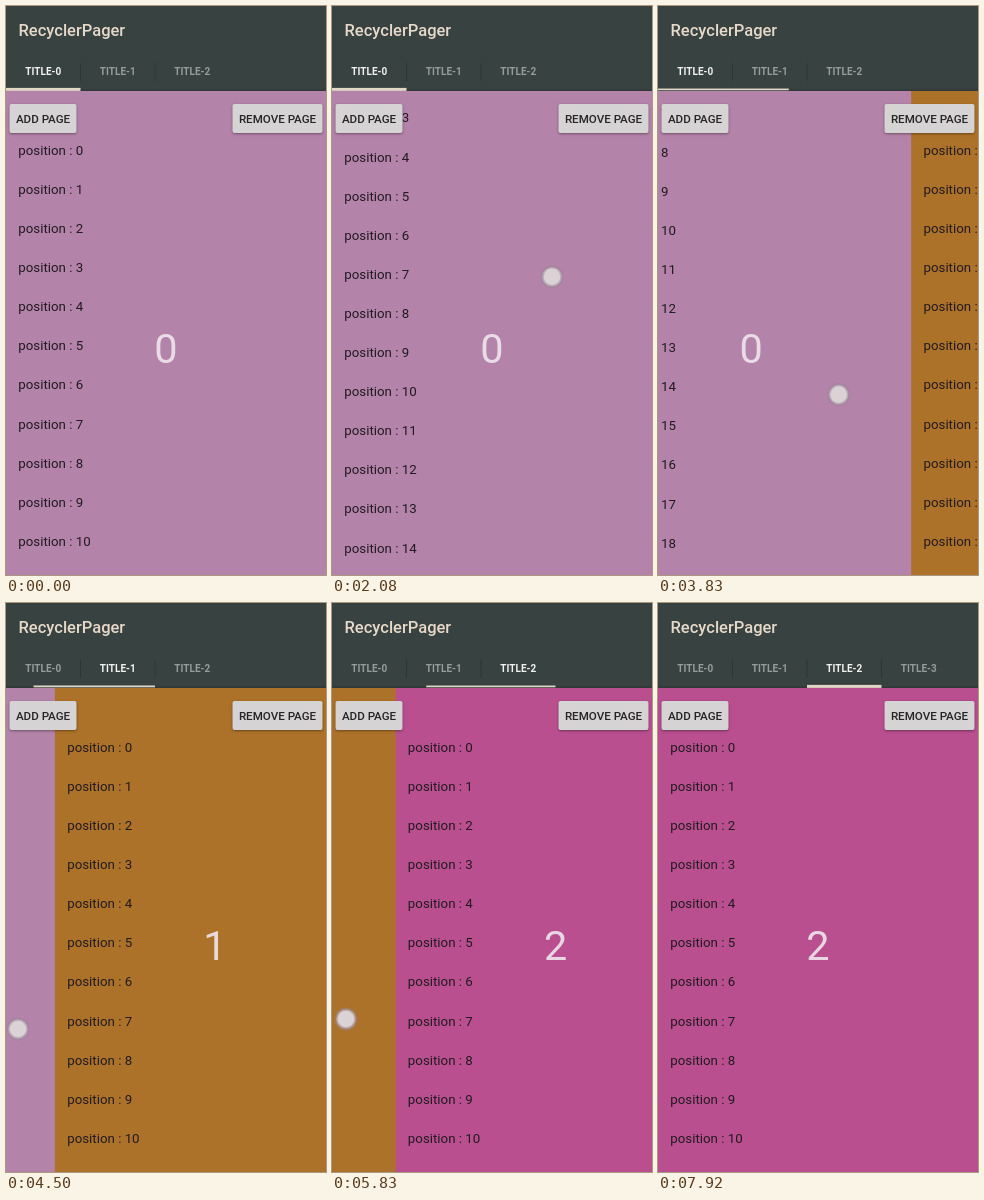
Animation, 320 px wide and 569 px high, one loop 8000 ms. Source, as an HTML page with a canvas:

```html
<!DOCTYPE html>
<html lang="en">
<head>
<meta charset="utf-8">
<title>RecyclerPager</title>
<style>
html, body { margin: 0; width: 100%; height: 100%; overflow: hidden; background: #384241; }
canvas { display: block; width: 100vw; height: 100vh; }
</style>
</head>
<body>
<canvas id="stage"></canvas>
<script>
const W = 320, H = 569, LOOP = 8000;
const BAR = 85, TAB = 74.5, ROW = 39.1;
const PAGES = ['#b483a9', '#ad7229', '#b94f8f'];
const canvas = document.getElementById('stage');
const ctx = canvas.getContext('2d');
const dpr = window.devicePixelRatio || 1;
canvas.width = Math.round(W * dpr);
canvas.height = Math.round(H * dpr);

const clamp = (v, a = 0, b = 1) => Math.min(b, Math.max(a, v));
const ramp = (t, a, b) => clamp((t - a) / (b - a));
const easeOut = (u, p) => 1 - Math.pow(1 - u, p);

// Linear track through [time, ...values] keys.
function track(keys, t) {
  if (t <= keys[0][0]) return keys[0].slice(1);
  for (let i = 1; i < keys.length; i++) {
    const a = keys[i - 1], b = keys[i];
    if (t <= b[0]) {
      const u = ramp(t, a[0], b[0]);
      return a.slice(1).map((v, k) => v + (b[k + 1] - v) * u);
    }
  }
  return keys[keys.length - 1].slice(1);
}

const SCROLL = { keys: [[130, 0], [1000, 56], [2080, 149.4], [2330, 215]], end: 3080, to: 311 };

// grip is the finger x at which the page begins to follow; settle is its snap time.
const SWIPES = [
  { down: 3330, up: 4410, settle: 380, grip: 247.5,
    path: [[3630, 256, 371], [3830, 181, 388.5], [4100, 92, 409], [4410, 12, 426]] },
  { down: 5210, up: 5720, settle: 450, grip: 222,
    path: [[5230, 231, 391], [5420, 132, 399], [5560, 68, 408], [5720, 14, 416]] }
];

function scrollAt(t) {
  const s = track(SCROLL.keys, t)[0];
  const u = ramp(t, SCROLL.keys[3][0], SCROLL.end);
  return s + (SCROLL.to - s) * easeOut(u, 2);
}

function pageAt(t) {
  let page = 0;
  for (const s of SWIPES) {
    const dragged = Math.max(0, s.grip - track(s.path, t)[0]) / W;
    page += dragged + (1 - dragged) * easeOut(ramp(t, s.up, s.up + s.settle), 2);
  }
  return page;
}

function text(str, x, y, font, color, align = 'left') {
  ctx.font = font + ' Roboto, sans-serif';
  ctx.fillStyle = color;
  ctx.textAlign = align;
  ctx.fillText(str, x, y);
}

function drawPage(i, x, scroll) {
  ctx.fillStyle = PAGES[i];
  ctx.fillRect(x, BAR, W + 1, H - BAR);
  for (let n = 0; n < 24; n++) {
    const y = 148.8 + n * ROW - scroll;
    if (y > BAR && y < H + 15) text('position : ' + n, x + 12.3, y, '13.3px', '#211a20');
  }
  text(String(i), x + 160, 356.5, '41.5px', 'rgba(238,230,236,.9)', 'center');
}

function drawBar(page, tabs) {
  ctx.fillStyle = '#384241';
  ctx.fillRect(0, 0, W, BAR);
  text('RecyclerPager', 12.5, 29.8, '500 16.5px', '#e6d9c9');
  const selected = Math.round(page);
  for (let i = 0; i < tabs; i++) {
    text('TITLE-' + i, TAB * (i + 0.5), 69.3, '700 10px', i === selected ? '#f1f1ef' : '#969c9b', 'center');
    if (i < tabs - 1) {
      ctx.fillStyle = '#2d3635';
      ctx.fillRect(TAB * (i + 1) - 0.5, 57, 1, 18);
    }
  }
  ctx.fillStyle = '#303938';
  ctx.fillRect(0, 83.5, W, 1.5);

  // The indicator stretches and thins while it travels.
  const base = Math.floor(page), f = page - base;
  const left = Math.pow(f, 6), right = easeOut(f, 6);
  const thick = 3 / (1 - left + right);
  ctx.fillStyle = '#e2d6c6';
  ctx.fillRect((base + left) * TAB, 83.4 - thick / 2, (1 + right - left) * TAB, thick);
}

function button(label, x, w, press = 0) {
  ctx.save();
  ctx.shadowColor = 'rgba(0,0,0,.4)';
  ctx.shadowBlur = 2.5 * dpr;
  ctx.shadowOffsetY = dpr;
  ctx.fillStyle = '#d6d3d5';
  ctx.beginPath();
  ctx.roundRect(x, 98, w, 29, 2);
  ctx.fill();
  ctx.restore();
  if (press > 0) {
    ctx.fillStyle = `rgba(90,80,88,${0.3 * press})`;
    ctx.beginPath();
    ctx.roundRect(x, 98, w, 29, 2);
    ctx.fill();
  }
  text(label, x + w / 2, 117.2, '500 11.6px', '#252526', 'center');
}

function disc(x, y, r, color) {
  ctx.fillStyle = color;
  ctx.beginPath();
  ctx.arc(x, y, r, 0, Math.PI * 2);
  ctx.fill();
}

function touch(x, y, alpha) {
  if (alpha <= 0) return;
  ctx.globalAlpha = alpha;
  disc(x, y, 11.5, 'rgba(150,135,150,.45)');
  disc(x, y, 9.8, 'rgba(190,180,186,.8)');
  disc(x, y, 8.3, '#dad2d5');
  ctx.globalAlpha = 1;
}

const shown = (t, down, up) => ramp(t, down - 40, down) * (1 - ramp(t, up, up + 80));

function draw(t) {
  const page = pageAt(t), scroll = scrollAt(t);
  ctx.setTransform(canvas.width / W, 0, 0, canvas.height / H, 0, 0);
  PAGES.forEach((_, i) => {
    const x = (i - page) * W;
    if (Math.abs(x) < W) drawPage(i, x, i === 0 ? scroll : 0);
  });
  drawBar(page, t < 7250 ? 3 : 4);
  button('ADD PAGE', 3.5, 67, ramp(t, 7000, 7150) * (1 - ramp(t, 7350, 7920)));
  button('REMOVE PAGE', 226.5, 90);

  touch(225 - scroll / 30, 420.4 - scroll, shown(t, 120, 2330));
  for (const s of SWIPES) {
    const [x, y] = track(s.path, t);
    touch(x, y, shown(t, s.down, s.up + 130));
  }
  touch(38, 114, shown(t, 7040, 7200));
}

function tick() {
  draw(performance.now() % LOOP);
  requestAnimationFrame(tick);
}
tick();
</script>
</body>
</html>
```
